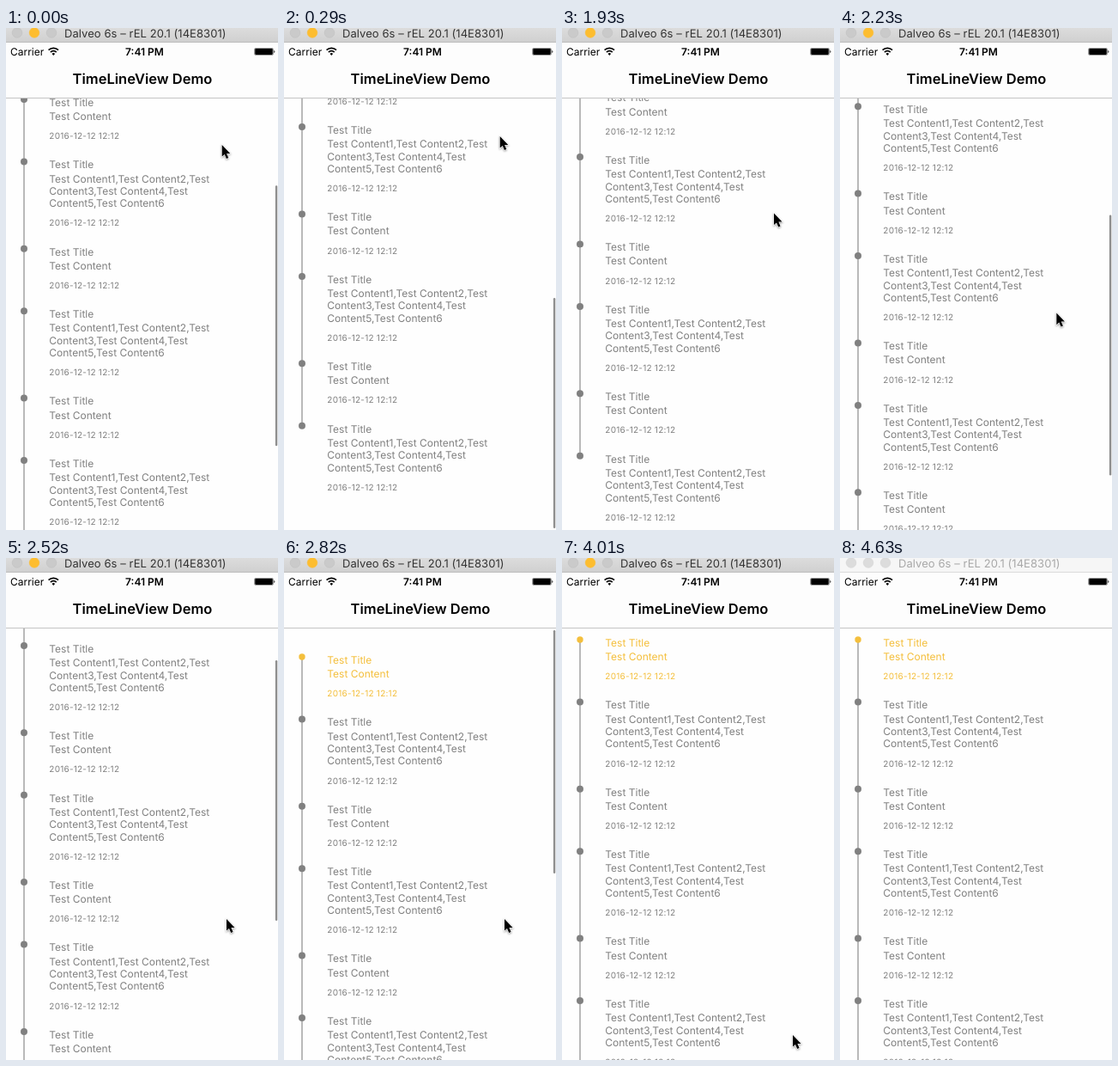
An HTML page that plays this animation: 317x584 px, repeating every 4730 ms.

```html
<!DOCTYPE html>
<html lang="en">
<head>
<meta charset="utf-8">
<title>Timeline demo</title>
<style>
  html, body { margin: 0; width: 100%; height: 100%; overflow: hidden; background: #fefefe; }
  svg { display: block; width: 100vw; height: 100vh; font-family: Inter, Roboto, sans-serif; text-rendering: geometricPrecision; }
  .item { fill: #808080; font-size: 12px; }
  .item.first { fill: #f4bf3c; }
  .date { font-size: 10px; letter-spacing: .23px; }
</style>
</head>
<body>
<svg viewBox="0 0 317 584">
  <defs>
    <linearGradient id="chrome" x2="0" y2="1">
      <stop stop-color="#dcdcdc"/><stop offset="1" stop-color="#d0d0d0"/>
    </linearGradient>
  </defs>
  <rect width="317" height="584" fill="#fefefe"/>
  <g id="list"></g>
  <rect id="bar" x="313.9" width="2.4" rx="1.2" fill="#8e8e8e"/>

  <rect y="16" width="317" height="65" fill="#fdfdfd"/>
  <rect y="81" width="317" height="1" fill="#c4c4c4"/>
  <g font-size="12">
    <text x="5" y="31.5">Carrier</text>
    <text x="161.5" y="31.5" text-anchor="middle" font-weight="600">7:41 PM</text>
  </g>
  <g fill="none" stroke="#000" stroke-width="1.7">
    <path d="M49.6 25.7a8 8 0 0 1 11.4 0M51.9 28.1a4.8 4.8 0 0 1 6.8 0"/>
    <path d="M55.3 31.9l-1.8-2a2.6 2.6 0 0 1 3.6 0z" fill="#000" stroke="none"/>
  </g>
  <rect x="289.5" y="23.5" width="22" height="8" rx="1.5" fill="#fff" stroke="#777" stroke-width=".7"/>
  <rect x="290.2" y="24.1" width="20.6" height="6.8" rx=".8"/>
  <path d="M312.4 26a1.7 1.7 0 0 1 0 3z"/>
  <text x="159" y="65" text-anchor="middle" font-size="16.5" font-weight="600">TimeLineView Demo</text>

  <rect id="frame" width="317" height="16"/>
  <rect id="edge" y="16" width="317" height="1"/>
  <g id="lights" stroke-width=".6">
    <circle cx="13" cy="5.5" r="5.8"/><circle cx="33" cy="5.5" r="5.8"/><circle cx="53" cy="5.5" r="5.8"/>
  </g>
  <text id="caption" x="68" y="11" font-size="13" letter-spacing=".07">Dalveo 6s – rEL 20.1 (14E8301)</text>

  <path id="cursor" d="M0 0V13.6L3 10.9 5.2 16 7.6 15 5.4 10H9.6Z"
    stroke="#fff" stroke-width="1.2" paint-order="stroke" style="filter:drop-shadow(0 1px 1px #0006)"/>
</svg>
<script>
const $ = id => document.getElementById(id);
const LOOP = 4730, MAX = 365, BAR = 303, BAR_RUN = 195;

// Timeline rows alternate between one and three lines of content
const shortText = ['Test Content'];
const longText = ['Test Content1,Test Content2,Test', 'Content3,Test Content4,Test', 'Content5,Test Content6'];
const label = (y, text, cls = '') => `<text x="50.3" y="${y}" class="${cls}">${text}</text>`;

let y = 95, rows = '';
for (let i = 0; i < 10; i++) {
  const lines = i % 2 ? longText : shortText;
  const extra = (lines.length - 1) * 14.4;
  rows += `<g class="item${i ? '' : ' first'}" transform="translate(0 ${y})">
    <circle cx="21" r="${i ? 4 : 3.7}"/>${label(7.8, 'Test Title')}
    ${lines.map((line, n) => label(24.1 + n * 14.4, line)).join('')}
    ${label(46.2 + extra, '2016-12-12 12:12', 'date')}</g>`;
  if (i < 9) y += 72.5 + extra;
}
$('list').innerHTML = `<rect x="20.2" y="95" width="1.6" height="${y - 95}" fill="#a8a8a8"/>` + rows;

// Tracks of [time, value...]
const scrollTrack = [[0, 185.8], [140, 310], [290, 400], [440, 389], [590, 373], [740, 367], [890, MAX],
  [1930, MAX], [2080, 332], [2220, 250], [2370, 158], [2520, 65.5], [2670, -16], [2810, -20],
  [2960, -6], [3110, -1], [3260, 0]];
const cursorTrack = [[0, 251.7, 136], [140, 251.7, 126], [890, 251.7, 126], [1040, 250, 198],
  [1340, 248, 219], [1640, 247, 215.5], [1930, 247, 215.5], [2080, 248, 249],
  [2370, 257, 420], [3410, 257, 420], [4010, 269, 555]];

function at(track, t) {
  const n = track.findIndex(key => key[0] > t);
  if (n < 0) return track[track.length - 1].slice(1);
  const a = track[n - 1], b = track[n], k = (t - a[0]) / (b[0] - a[0]);
  return a.slice(1).map((v, i) => v + (b[i + 1] - v) * k);
}

// The picture refreshes about every 150 ms
const ticks = [0, 140];
for (let t = 140; t < LOOP; ticks.push(t)) t += [1640, 2080, 2670].includes(t) ? 140 : 150;

function setWindow(active) {
  $('frame').setAttribute('fill', active ? 'url(#chrome)' : '#f6f6f6');
  $('edge').setAttribute('fill', active ? '#bcbcbc' : '#dadada');
  $('caption').setAttribute('fill', active ? '#333' : '#a8a8a8');
  [...$('lights').children].forEach((dot, i) => {
    const lit = active && i === 1;
    dot.setAttribute('fill', lit ? '#fdbd2f' : active ? '#cacaca' : '#dcdcdc');
    dot.setAttribute('stroke', lit ? '#fdbd2f' : active ? '#c0c0c0' : '#d4d4d4');
  });
}

function draw(now) {
  const time = now % LOOP;
  const t = ticks.filter(tick => tick <= time).pop();
  const [scroll] = at(scrollTrack, t);
  const [cx, cy] = at(cursorTrack, t);
  const past = Math.max(0, scroll - MAX), before = Math.max(0, -scroll);
  const inside = Math.min(MAX, Math.max(0, scroll));

  $('list').setAttribute('transform', `translate(0 ${-scroll})`);
  $('bar').setAttribute('y', 84 + inside / MAX * BAR_RUN + past);
  $('bar').setAttribute('height', BAR - past - before);
  $('bar').style.display = t < 1040 || t >= 2080 && t < 3410 ? '' : 'none';
  $('cursor').setAttribute('transform', `translate(${cx} ${cy})`);
  $('cursor').style.display = t < 4160 ? '' : 'none';
  setWindow(time < 4630);
}

const start = performance.now();
(function loop() {
  draw(performance.now() - start);
  requestAnimationFrame(loop);
})();
</script>
</body>
</html>
```
